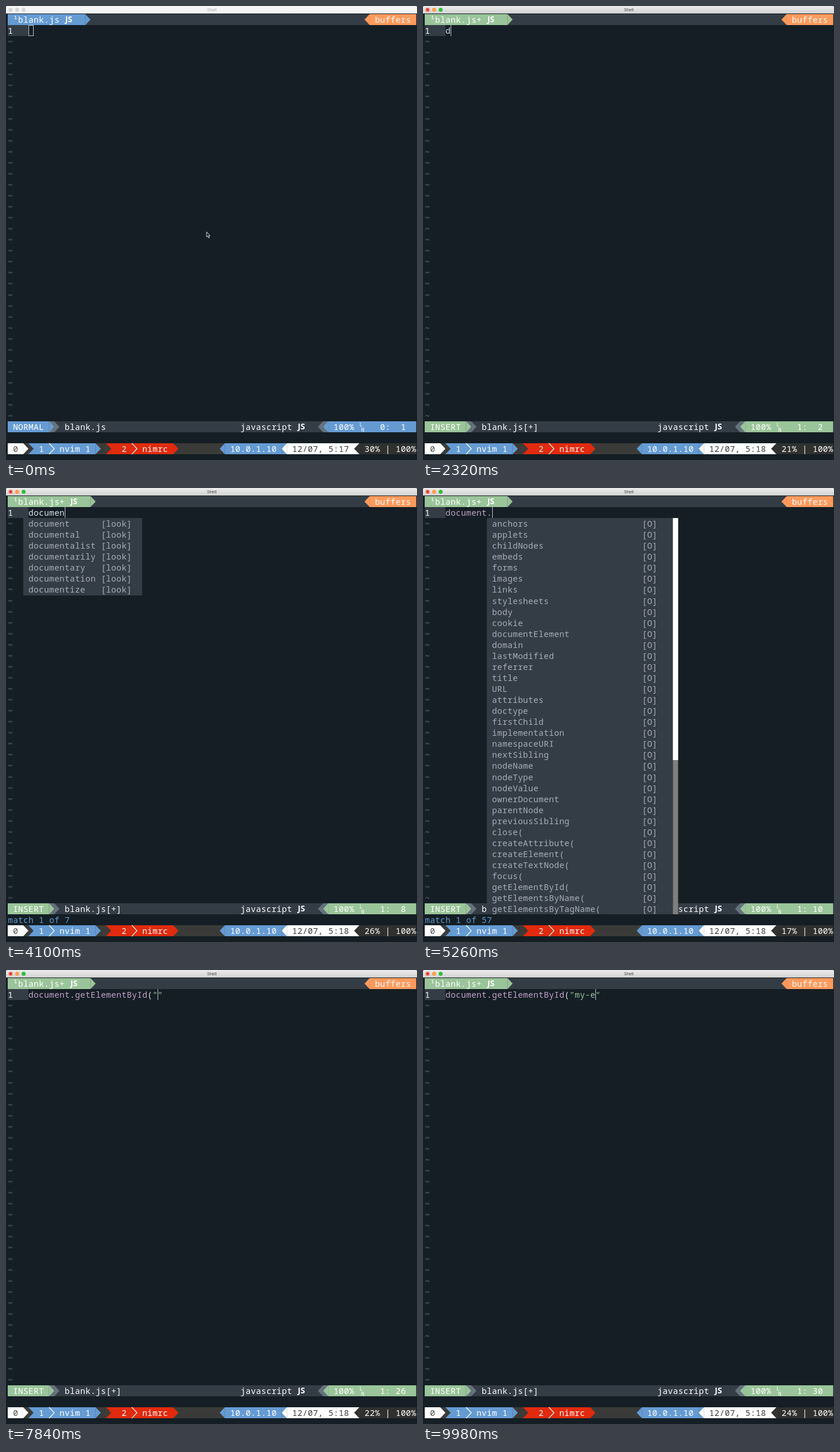
These frames come from a looping animation (713 px wide and 786 px high, 10000 ms). An HTML page with a canvas:

```html
<!DOCTYPE html>
<html lang="en">
<head>
<meta charset="utf-8">
<title>Shell</title>
<style>
html, body { margin: 0; width: 100%; height: 100%; overflow: hidden; background: #141e24; }
canvas { display: block; }
</style>
</head>
<body>
<canvas id="stage" width="713" height="786"></canvas>
<script>
const ctx = document.getElementById('stage').getContext('2d');
const LOOP = 10000, CELL = 8.97, ROW = 19.06, LEFT = 3, TOP = 14, COLS = 79;
const BG = '#141e24', PANEL = '#343d46', GREY = '#65737e', FG = '#d8dee9', MENU_FG = '#a7adba',
  BLUE = '#659bd3', GREEN = '#9ac499', ORANGE = '#ff9a5c', RED = '#e12a0e',
  PURPLE = '#c5a0c9', BAR = '#3a3b38', BAR_END = '#30312f', WHITE = '#fff';

const FOCUS = 500, INSERT = 1000, LAG = 60;
// Each entry: time, text before the cursor, text after it
const edits = [
  [0, ''], [2000, 'd'], [2350, 'do'], [2700, 'doc'], [3050, 'docu'], [3390, 'docum'],
  [3720, 'docume'], [3960, 'documen'], [4220, 'document'], [4620, 'document.'],
  [6080, 'document.g'], [6400, 'document.ge'], [6740, 'document.get'],
  [7200, 'document.getElementById('], [7600, 'document.getElementById("', '"'],
  [8480, 'document.getElementById("m', '"'], [8860, 'document.getElementById("my', '"'],
  [9300, 'document.getElementById("my-', '"'], [9760, 'document.getElementById("my-e', '"']
];
const battery = [[0, '30'], [700, '21'], [2400, '26'], [4400, '17'], [6100, '16'], [7300, '22'], [8900, '24']];

const words = ['', 'al', 'alist', 'arily', 'ary', 'ation', 'ize'].map(end => 'document' + end);
const members = `anchors applets childNodes embeds forms images links stylesheets body cookie
  documentElement domain lastModified referrer title URL attributes doctype firstChild implementation
  namespaceURI nextSibling nodeName nodeType nodeValue ownerDocument parentNode previousSibling close(
  createAttribute( createElement( createTextNode( focus( getElementById( getElementsByName(
  getElementsByTagName(`.split(/\s+/);

const x = col => LEFT + col * CELL;
const y = row => TOP + row * ROW;
const latest = (list, t) => list.filter(entry => entry[0] <= t).pop();

function fill(row, col, cols, color, rows = 1) {
  ctx.fillStyle = color;
  const top = Math.round(y(row));
  ctx.fillRect(x(col), top, cols * CELL, Math.round(y(row + rows)) - top);
}

function text(row, col, string, color) {
  ctx.font = '14.4px "Noto Sans Mono", monospace';
  ctx.textAlign = 'center';
  ctx.fillStyle = color;
  [...string].forEach((ch, i) => ctx.fillText(ch, x(col + i + .5), y(row) + 15));
}

// Powerline separators; dir 1 points right, -1 points left
function arrow(row, col, dir, color, back, thin) {
  if (back) fill(row, col, 1, back);
  const base = x(dir > 0 ? col : col + 1), top = Math.round(y(row)), bottom = Math.round(y(row + 1));
  ctx.beginPath();
  ctx.moveTo(base, top);
  ctx.lineTo(base + dir * CELL, (top + bottom) / 2);
  ctx.lineTo(base, bottom);
  ctx.fillStyle = ctx.strokeStyle = color;
  ctx.lineWidth = 1.2;
  thin ? ctx.stroke() : ctx.fill();
}

function badge(row, col) {
  ctx.font = 'bold 14px "Open Sans", sans-serif';
  ctx.textAlign = 'left';
  ctx.fillStyle = WHITE;
  ctx.fillText('JS', x(col) + 1, y(row) + 14);
}

function titleBar(active) {
  const shade = ctx.createLinearGradient(0, 0, 0, 13);
  shade.addColorStop(0, active ? '#ececec' : '#f6f6f6');
  shade.addColorStop(1, active ? '#d2d2d2' : '#f3f3f3');
  ctx.fillStyle = shade;
  ctx.beginPath();
  ctx.roundRect(0, 0, 713, 13, [2, 2, 0, 0]);
  ctx.fill();
  ['#f95f50', '#ff9d4c', '#2fbf3d'].forEach((color, i) => {
    ctx.fillStyle = active ? color : '#d6d6d6';
    ctx.beginPath();
    ctx.arc(8 + i * 11.3, 6.5, 3.5, 0, 7);
    ctx.fill();
  });
  if (active) {
    ctx.fillStyle = '#7a1a12';
    ctx.beginPath();
    ctx.arc(8, 6.5, 1.1, 0, 7);
    ctx.fill();
  }
  ctx.font = '7.5px "Liberation Sans", Arial, sans-serif';
  ctx.textAlign = 'center';
  ctx.fillStyle = active ? '#444' : '#aaa';
  ctx.fillText('Shell', 357, 9.3);
}

function tabLine(accent, changed) {
  const end = changed ? 16 : 15;
  fill(0, 0, COLS, PANEL);
  fill(0, 0, end, accent);
  arrow(0, end, 1, accent);
  text(0, 1, '¹blank.js' + (changed ? '+' : ''), WHITE);
  badge(0, end - 4);
  arrow(0, 69, -1, ORANGE);
  fill(0, 70, 9, ORANGE);
  text(0, 71, 'buffers', WHITE);
}

function statusLine(accent, mode, changed, column) {
  fill(37, 0, COLS, PANEL);
  fill(37, 0, 8, accent);
  arrow(37, 8, 1, accent, GREY);
  arrow(37, 9, 1, GREY);
  text(37, 1, mode, WHITE);
  text(37, 11, 'blank.js' + (changed ? '[+]' : ''), WHITE);
  text(37, 45, 'javascript', WHITE);
  badge(37, 56);
  arrow(37, 60, -1, GREY);
  arrow(37, 61, -1, accent, GREY);
  fill(37, 62, 17, accent);
  text(37, 63, '100%', WHITE);
  text(37, 72, (changed ? '1' : '0') + ':' + String(column).padStart(3), WHITE);
  ctx.font = '9px "Noto Sans Mono", monospace';
  ctx.fillText('L', x(68) + 3, y(37) + 8.5);
  ctx.fillText('N', x(68) + 6, y(37) + 17.5);
}

function sessionBar(clock, charge) {
  fill(39, 0, COLS, BAR);
  fill(39, 0, 3, WHITE);
  arrow(39, 3, 1, WHITE);
  text(39, 1, '0', '#4a4a48');
  fill(39, 4, 13, BLUE);
  arrow(39, 4, 1, BAR);
  text(39, 6, '1', WHITE);
  arrow(39, 8, 1, WHITE, null, true);
  text(39, 10, 'nvim 1', WHITE);
  arrow(39, 17, 1, BLUE);
  fill(39, 19, 13, RED);
  arrow(39, 19, 1, BAR);
  text(39, 22, '2', WHITE);
  arrow(39, 24, 1, WHITE, null, true);
  text(39, 26, 'nimrc', WHITE);
  arrow(39, 32, 1, RED);
  arrow(39, 41, -1, BLUE);
  fill(39, 42, 11, BLUE);
  text(39, 43, '10.0.1.10', WHITE);
  arrow(39, 53, -1, WHITE, BLUE);
  fill(39, 54, 13, WHITE);
  text(39, 55, '12/07, ' + clock, '#3a3a38');
  arrow(39, 67, -1, BAR_END, WHITE);
  fill(39, 68, 11, BAR_END);
  text(39, 69, charge + '% | 100%', WHITE);
}

function menu(col, cols, items, tagCol, tag) {
  fill(2, col, cols, PANEL, items.length);
  items.forEach((item, i) => {
    text(2 + i, col + 1, item, MENU_FG);
    text(2 + i, tagCol, tag, MENU_FG);
  });
}

function completion(t, before) {
  if (t >= 3050 + LAG && t < 4620) {
    menu(3, 23, words, 18, '[look]');
    return 'match 1 of 7';
  }
  if (t >= 4850 && t < 6080) {
    menu(12, 36, members, 42, '[O]');
    fill(2, 48, 1, '#7f7f7d', 36);
    fill(2, 48, 1, WHITE, 22);
    return 'match 1 of 57';
  }
  if (t >= 6080 && t < 7200) {
    menu(12, 28, members.filter(name => name.startsWith(before.slice(9))), 35, '[O]');
    return t < 6740 + LAG ? 'match 1 of 57' : 'match 1 of 3';
  }
  return '';
}

function codeLine(code) {
  const tokens = code.match(/".*|\w+|\W/g) || [];
  let col = 4;
  for (const token of tokens) {
    const color = token[0] === '"' ? GREEN
      : /^(document|get|getElementById)$/.test(token) ? PURPLE : FG;
    text(1, col, token, color);
    col += token.length;
  }
}

function cursor(col, focused, inserting) {
  const left = Math.round(x(col)), top = Math.round(y(1));
  ctx.fillStyle = ctx.strokeStyle = '#c0c5ce';
  ctx.lineWidth = 1;
  if (inserting) ctx.fillRect(left, top, 1, 19);
  else if (focused) ctx.fillRect(left, top, 9, 19);
  else ctx.strokeRect(left + .5, top + .5, 8, 18);
}

function pointer() {
  ctx.save();
  ctx.translate(348, 391);
  ctx.fillStyle = BG;
  ctx.strokeStyle = '#d5d8da';
  ctx.lineWidth = 1;
  ctx.stroke(ctx.clip ? new Path2D('M0 0V9L2 7.2 3.6 10.5 5 9.8 3.6 6.7H6Z') : undefined);
  ctx.restore();
}

function draw(t) {
  const focused = t >= FOCUS, inserting = t >= INSERT;
  const [, before, after = ''] = latest(edits, t);
  const settled = latest(edits, Math.max(0, t - LAG))[1];
  const accent = inserting ? GREEN : BLUE, changed = before !== '';

  ctx.fillStyle = BG;
  ctx.fillRect(0, 0, 713, 786);
  titleBar(focused);
  tabLine(accent, changed);
  fill(1, 0, 4, PANEL);
  text(1, 0, '1', WHITE);
  for (let row = 2; row < 37; row++) text(row, 0, '~', GREY);
  codeLine(before + after);
  cursor(4 + before.length, focused, inserting);
  statusLine(accent, inserting ? 'INSERT' : 'NORMAL', changed, settled.length + 1);
  text(38, 0, completion(t, before), BLUE);
  sessionBar(t < battery[1][0] ? '5:17' : '5:18', latest(battery, t)[1]);
  if (!focused) pointer();
}

function tick() {
  draw(performance.now() % LOOP);
  requestAnimationFrame(tick);
}
tick();
</script>
</body>
</html>
```
